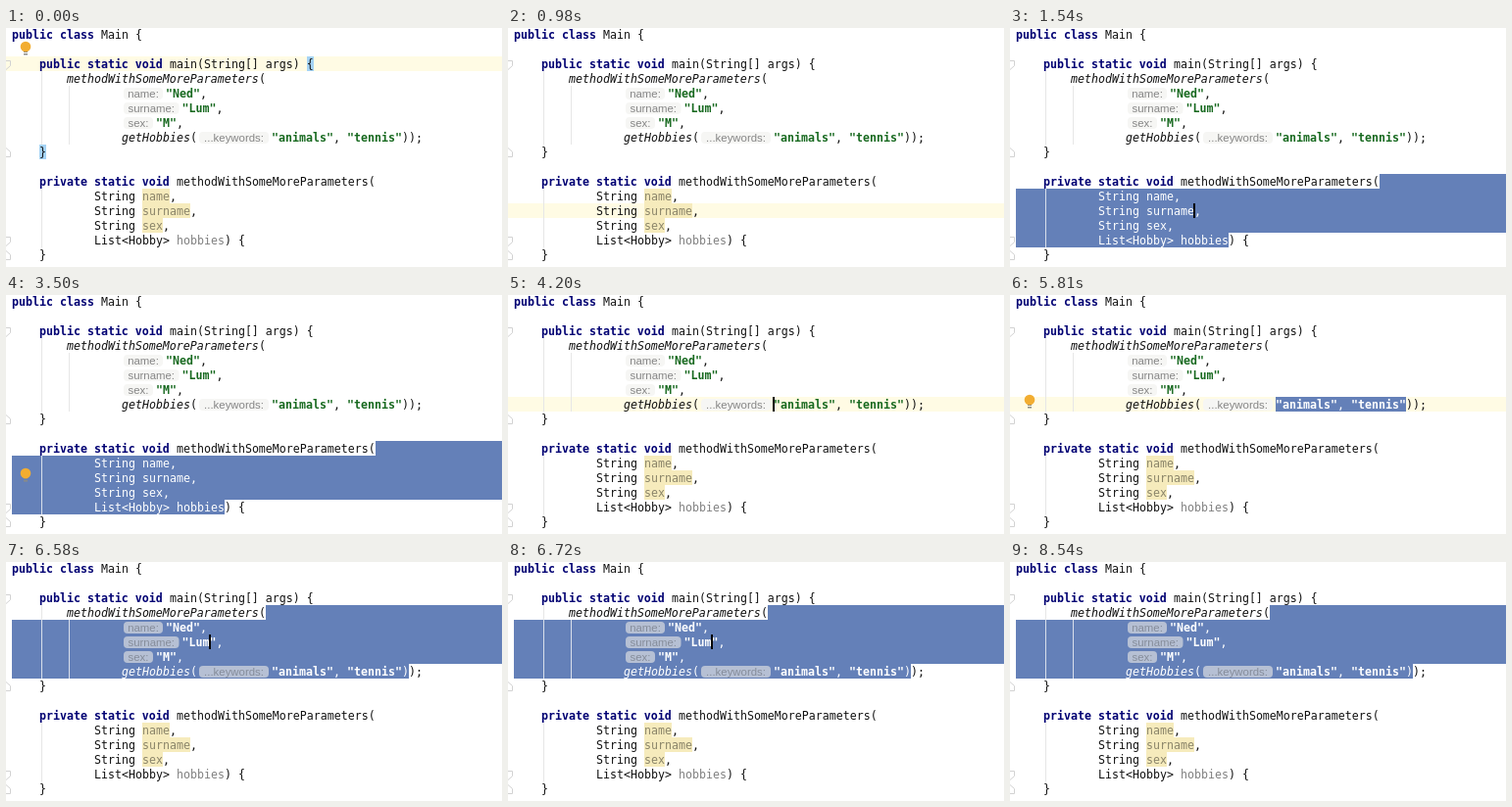
An HTML page with a canvas for the animation above (8610 ms loop, 506 px wide and 244 px high).

```html
<!DOCTYPE html>
<html lang="en">
<head>
<meta charset="utf-8">
<title>Select parameters</title>
<style>
html, body { margin: 0; width: 100%; height: 100%; overflow: hidden; background: #fff; }
canvas { display: block; width: 506px; height: 244px; }
</style>
</head>
<body>
<canvas id="stage" width="506" height="244"></canvas>
<script>
const ctx = document.getElementById('stage').getContext('2d');
const W = 506, H = 244, LOOP = 8610;
const LEFT = 6, CHAR = 7, ROW = 15;
const MONO = '11.628px "DejaVu Sans Mono", monospace';
const HINT_FONT = '11.4px "Liberation Sans", sans-serif';
const SELECTION = '#6480b8';

// Style: font face, colour
const STYLES = {
  plain: ['', '#111'],
  key: ['bold ', '#000073'],
  str: ['bold ', '#17691f'],
  call: ['italic ', '#111'],
  gray: ['', '#808080'],
  unused: ['', '#8a8469']
};

// Token: [style, text, advance for hints]
const plain = s => ['plain', s];
const key = s => ['key', s];
const str = s => ['str', s];
const call = s => ['call', s];
const hint = (s, advance) => ['hint', s, advance];

// Line: [row, indent in columns, ...tokens]
const CODE = [
  [0, 0, key('public class '), plain('Main {')],
  [2, 4, key('public static void '), plain('main(String[] args) {')],
  [3, 8, call('methodWithSomeMoreParameters'), plain('(')],
  [4, 16, hint('name:', 45), str('"Ned"'), plain(',')],
  [5, 16, hint('surname:', 61.5), str('"Lum"'), plain(',')],
  [6, 16, hint('sex:', 35), str('"M"'), plain(',')],
  [7, 16, call('getHobbies'), plain('('), hint('...keywords:', 76),
    str('"animals"'), plain(', '), str('"tennis"'), plain('));')],
  [8, 4, plain('}')],
  [10, 4, key('private static void '), plain('methodWithSomeMoreParameters(')],
  [11, 12, plain('String '), ['unused', 'name'], plain(',')],
  [12, 12, plain('String '), ['unused', 'surname'], plain(',')],
  [13, 12, plain('String '), ['unused', 'sex'], plain(',')],
  [14, 12, plain('List<Hobby> '), ['gray', 'hobbies'], plain(') {')],
  [15, 4, plain('}')]
];

// Selections: start row, start x, end row, end x
const PARAMS = [10, 377, 14, 223];
const HOBBIES = [7, 271, 7, 404];
const ARGS = [3, 265, 7, 411];

const SCENES = [
  { at: 0, line: 2, bulb: 19, braces: true },
  { at: 490, line: 12, caret: 188 },
  { at: 1330, line: 12, caret: 188, sel: PARAMS },
  { at: 2170, line: 12, caret: 188, sel: PARAMS, bulb: 182 },
  { at: 3570, line: 7, caret: 271 },
  { at: 4270, line: 7, caret: 271, sel: HOBBIES },
  { at: 5040, line: 7, caret: 271, sel: HOBBIES, bulb: 107 },
  { at: 5880, line: 5, caret: 208 },
  { at: 6300, line: 5, caret: 208, sel: ARGS }
];

// Spans of time with the caret blinked off
const CARET_OFF = [[980, 1330], [2170, 2660], [3150, 3570], [3710, 4200],
  [4760, 5250], [5740, 5880], [7490, 7910], [8540, LOOP]];

const rowTop = row => row * ROW - 1;

function box(color, x, y, w, h) {
  ctx.fillStyle = color;
  ctx.fillRect(x, y, w, h);
}

function drawHint(text, x, row, advance, selected) {
  const w = advance - 5;
  ctx.fillStyle = selected ? '#b6c0d4' : '#f6f6f4';
  ctx.beginPath();
  ctx.roundRect(x + 2, rowTop(row) + 2, w, 12, 4);
  ctx.fill();
  ctx.font = HINT_FONT;
  ctx.fillStyle = selected ? '#858c9a' : '#858585';
  ctx.textAlign = 'center';
  ctx.fillText(text, x + 2 + w / 2, row * ROW + 11);
  ctx.textAlign = 'left';
}

function drawCode(selected) {
  for (const [row, indent, ...tokens] of CODE) {
    let x = LEFT + indent * CHAR;
    for (const [style, text, advance] of tokens) {
      const width = advance || text.length * CHAR;
      if (style === 'hint') {
        drawHint(text, x, row, advance, selected);
      } else {
        const [face, color] = STYLES[style];
        if (style === 'unused' && !selected) box('#f6ebbc', x, rowTop(row), width, ROW);
        ctx.font = face + MONO;
        ctx.fillStyle = selected ? '#fff' : color;
        ctx.fillText(text, x, row * ROW + 11);
      }
      x += width;
    }
  }
}

function drawGuides(color) {
  box(color, 36, rowTop(3), 1, 5 * ROW);
  box(color, 64, rowTop(4), 1, 4 * ROW);
  box(color, 36, rowTop(11), 1, 4 * ROW);
}

function drawFold(row, dir) {
  const y = row * ROW + 7.5;
  ctx.strokeStyle = '#d2d2d2';
  ctx.lineWidth = 1;
  ctx.beginPath();
  ctx.moveTo(0, y - 4 * dir);
  ctx.lineTo(4.5, y - 4 * dir);
  ctx.lineTo(4.5, y + dir);
  ctx.lineTo(0, y + 5 * dir);
  ctx.stroke();
}

function drawSelection([r1, x1, r2, x2]) {
  ctx.save();
  ctx.beginPath();
  for (let r = r1; r <= r2; r++) {
    const a = r === r1 ? x1 : LEFT;
    const b = r === r2 ? x2 : W;
    ctx.rect(a, rowTop(r), b - a, ROW);
  }
  ctx.clip();
  box(SELECTION, 0, 0, W, H);
  drawGuides('#d9dfea');
  drawCode(true);
  ctx.restore();
}

function drawBulb(y) {
  box('#8b8b86', 18, y + 5, 4, 1);
  box('#8b8b86', 18, y + 7, 4, 1.5);
  ctx.fillStyle = '#f2ad31';
  ctx.beginPath();
  ctx.arc(20, y, 5.3, 0, Math.PI * 2);
  ctx.fill();
}

function draw(t) {
  const s = SCENES.filter(scene => t >= scene.at).pop();
  const caretOn = !CARET_OFF.some(([a, b]) => t >= a && t < b);

  box('#fff', 0, 0, W, H);
  if (!s.sel || s.sel === HOBBIES) box('#fffbe4', 0, rowTop(s.line), W, ROW);
  if (s.braces) {
    box('#a5d3f5', 307, rowTop(2), CHAR, ROW);
    box('#a5d3f5', 34, rowTop(8), CHAR, ROW);
  }
  drawGuides('#e6e6e6');
  drawFold(2, 1);
  drawFold(8, -1);
  drawFold(14, 1);
  drawFold(15, -1);
  drawCode(false);
  if (s.sel) drawSelection(s.sel);
  if (s.bulb) drawBulb(s.bulb);
  if (s.caret && caretOn) box('#000', s.caret - 1, rowTop(s.line), 2, ROW);
}

function tick() {
  draw(performance.now() % LOOP);
  requestAnimationFrame(tick);
}
tick();
</script>
</body>
</html>
```
